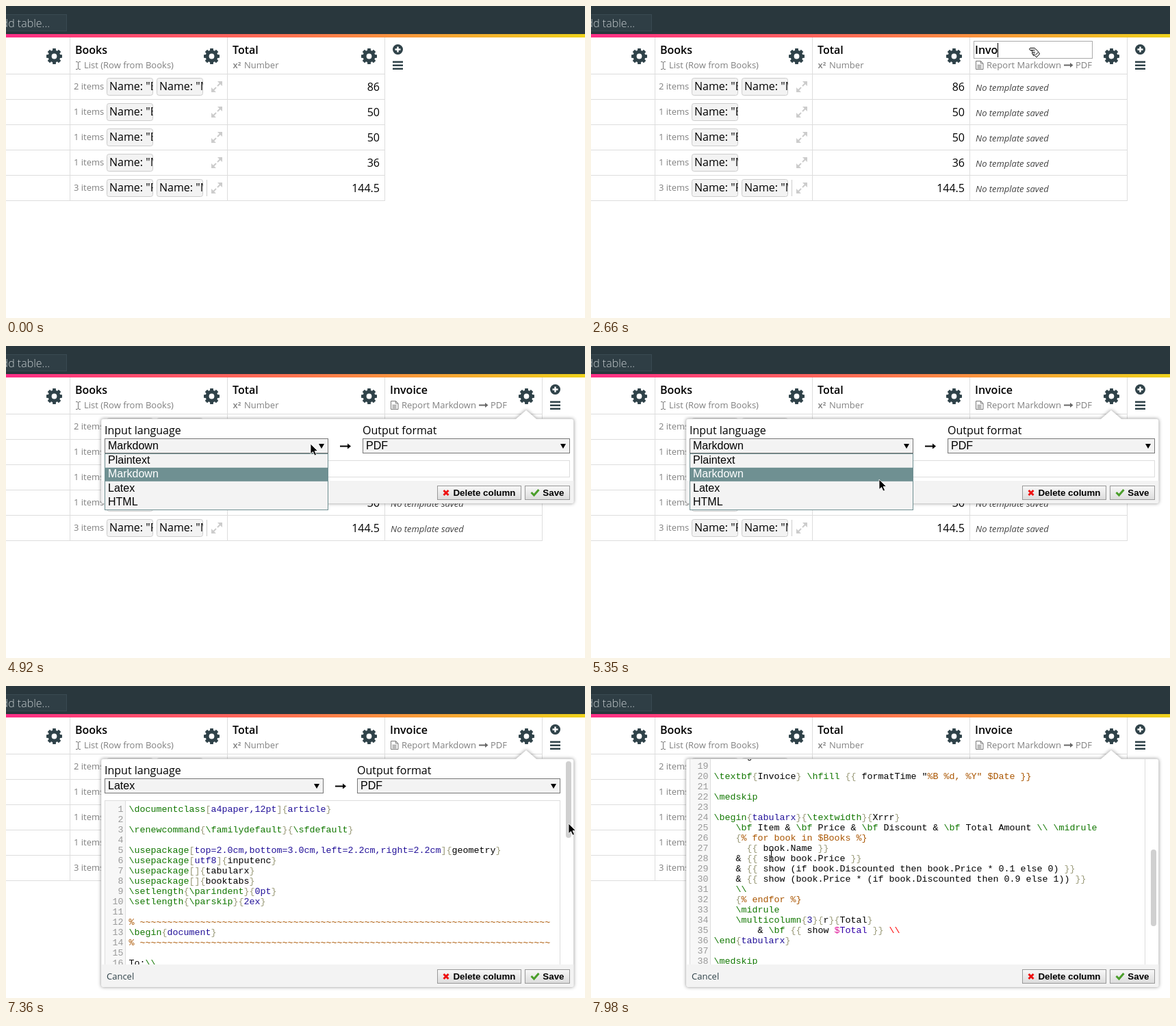
Recreate the animation shown at these times as an HTML page. Size 846 px wide and 456 px high, loop 8 s.

```html
<!DOCTYPE html>
<html lang="en">
<head>
<meta charset="utf-8">
<title>Report column</title>
<style>
html, body { margin: 0; width: 100%; height: 100%; overflow: hidden; background: #fff }
svg { display: block }
text { white-space: pre; font: 16px 'Open Sans', sans-serif }
.end { text-anchor: end }
.bold { font-weight: 600 }
.light { font-weight: 300; fill: #c3cacc }
.small { font-size: 13px; fill: #808080 }
.note { font-size: 13px; font-style: italic; fill: #444 }
.link { font-size: 13px; fill: #2f4249 }
.ui { font: 16px 'Liberation Sans', Arial, sans-serif }
.btn { font: bold 13.333px 'Liberation Sans', Arial, sans-serif }
.code { font: 13.333px 'Liberation Mono', monospace }
.num { fill: #999 }
.panel { filter: drop-shadow(0 0 2.5px rgba(0,0,0,.4)) }
</style>
</head>
<body>
<svg id="stage" width="846" height="456" viewBox="0 0 846 456"></svg>
<script>
const DARK = '#2f4249', PINK = '#ff1f87', LOOP = 8000, STEP = 10;
const $ = id => document.getElementById(id);
const range = n => [...Array(n).keys()];
const text = (x, y, s, cls = '', more = '') => `<text x="${x}" y="${y}" class="${cls}" ${more}>${s}</text>`;
const rect = (x, y, w, h, fill, more = '') => `<rect x="${x}" y="${y}" width="${w}" height="${h}" fill="${fill}" ${more}/>`;
const line = (d, color, w = 1) => `<path d="${d}" fill="none" stroke="${color}" stroke-width="${w}"/>`;
const shape = (d, fill, more = '') => `<path d="${d}" fill="${fill}" ${more}/>`;
const group = (id, body, more = '') => `<g id="${id}" ${more}>${body}</g>`;

// ---- table ----
const gearPath = 'M' + range(8).flatMap(i =>
  [[9, -.28], [11.7, -.2], [11.7, .2], [9, .28]].map(([r, da]) => {
    const a = i * Math.PI / 4 + da;
    return (r * Math.cos(a)).toFixed(2) + ' ' + (r * Math.sin(a)).toFixed(2);
  })).join('L') + 'Z';
const gear = (x, id = '') => `<g transform="translate(${x} 73.5)">` +
  shape(gearPath, DARK, id && `id="${id}"`) + '<circle r="3.9" fill="#fff"/></g>';

const chip = (x, y, letter) =>
  rect(x + .5, y + .5, 67, 25, '#f3f3f3', 'rx="3" stroke="#ccc"') +
  `<svg x="${x}" y="${y}" width="67.5" height="26">${text(4, 18, 'Name: "' + letter)}</svg>`;

const expand = y => shape(`M316 ${y + 10}v7l-7-7zM300 ${y + 26}v-7l7 7z`, '#ccc') +
  line(`M314 ${y + 12}l-5 5M302 ${y + 24}l5-5`, '#ccc', 2);

const rows = [[2, 'BM', 86], [1, 'B', 50], [1, 'B', 50], [1, 'M', 36], [3, 'PM', 144.5]];
const row = ([n, letters, total], i) => {
  const y = 100 + 37 * i;
  return text(99, y + 22, n + ' items', 'small') +
    [...letters].map((c, k) => chip(147 + 73 * k, y + 5, c)).join('') +
    (n > 2 ? line(`M293.5 ${y + 6}v24`, '#ccc') : '') +
    expand(y) + text(546, y + 24, total, 'end');
};
const grid = (x, w) => line(range(6).map(i => `M${x} ${99.5 + 37 * i}h${w}`).join('') +
  `M${x + w - .5} 46v239`, '#ddd');

const header = rect(0, 0, 846, 41, '#29373d') +
  rect(-5, 12.5, 93.5, 24, '#2f3e45', 'stroke="#394a52"') +
  text(64, 31, 'Add table...', 'light end') + rect(0, 41, 846, 5, 'url(#rainbow)');

const table = grid(0, 554) + line('M93.5 46v239M323.5 46v239', '#ddd') +
  gear(70.5) + gear(300.5) + gear(530.5) +
  text(101, 70, 'Books', 'bold') + text(114, 91, 'List (Row from Books)', 'small') +
  line('M102 81.5h2l1.5 1 1.5-1h2M105.5 82v10M102 92.5h2l1.5-1 1.5 1h2', '#777') +
  text(331, 70, 'Total', 'bold') + text(331.5, 91, 'x²', 'small bold') + text(348, 91, 'Number', 'small') +
  rows.map(row).join('');

const newColumn = grid(554, 230) + gear(760.5, 'gear') +
  rect(559.5, 51.5, 173, 25, '#fff', 'id="box" stroke="#aaa"') +
  text(561, 70, 'Name...', '', 'id="hint" fill="#999"') + text(561, 70, '', 'bold', 'id="title"') +
  rect(561, 54, 1, 21, '#000', 'id="caret"') +
  line('M562.5 80.5h7l3.5 3.5v8.5h-10.5zM569.5 80.5v3.5h3.5M564.5 86.5h6M564.5 88.5h6M564.5 90.5h6', '#777') +
  text(578, 91, 'Report Markdown', 'small') + text(708, 91, 'PDF', 'small') +
  line('M691 86.5h10', '#666', 2) + shape('M700 83l4.5 3.5-4.5 3.5z', '#666') +
  range(5).map(i => text(562, 124 + 37 * i, 'No template saved', 'note')).join('');

const adders = `<circle cx="572.5" cy="63.5" r="7.5" fill="${DARK}"/>` + line('M568.5 63.5h8M572.5 59.5v8', '#fff', 2.4) +
  shape('M565 80.5h15v2.5h-15zM565 85.5h15v2.5h-15zM565 90.5h15v2.5h-15z', DARK, 'id="menu"');

// ---- template editor ----
const source = String.raw`\documentclass[a4paper,12pt]{article}

\renewcommand{\familydefault}{\sfdefault}

\usepackage[top=2.0cm,bottom=3.0cm,left=2.2cm,right=2.2cm]{geometry}
\usepackage[utf8]{inputenc}
\usepackage[]{tabularx}
\usepackage[]{booktabs}
\setlength{\parindent}{0pt}
\setlength{\parskip}{2ex}

%~
\begin{document}
%~

To:\\
Tilman Voske\\
Hamburg

\textbf{Invoice} \hfill {{ formatTime "%B %d, %Y" $Date }}

\medskip

\begin{tabularx}{\textwidth}{Xrrr}
    \bf Item & \bf Price & \bf Discount & \bf Total Amount \\ \midrule
    {% for book in $Books %}
      {{ book.Name }}
    & {{ show book.Price }}
    & {{ show (if book.Discounted then book.Price * 0.1 else 0) }}
    & {{ show (book.Price * (if book.Discounted then 0.9 else 1)) }}
    \\
    {% endfor %}
    \midrule
    \multicolumn{3}{r}{Total}
        & \bf {{ show $Total }} \\
\end{tabularx}

\medskip`.replaceAll('%~', '% ' + '~'.repeat(75)).split('\n');

const tokens = [
  ['#a50', '%.*'],
  ['#f00', String.raw`(?<=\}\} )\\\\`],
  ['#170', String.raw`\\[a-z]+|\\\\`],
  ['#219', String.raw`(?<=\[)[^\]]+|(?<=pt\]\{|begin\{|end\{)\w+|(?<=\{)\d\w*`],
  ['#997', String.raw`[{}\[\]]`],
  ['#e0189a', String.raw`\$`],
  ['#30a', String.raw`(?<=\$)Total`],
];
const syntax = new RegExp(tokens.map(([, re]) => `(${re})`).join('|'), 'g');
const paint = s => s.replace(syntax, (m, ...found) =>
  `<tspan fill="${tokens[found.findIndex((g, i) => i < tokens.length && g !== undefined)][0]}">${m}</tspan>`);
const codeLine = (s, i) => text(171.5, 184 + 15 * i, i + 1, 'code num end') +
  text(179.5, 184 + 15 * i, paint(s.replaceAll('&', '&amp;')), 'code');

const select = (x, right, label, id) =>
  rect(x + .5, 135.5, right - x, 21, '#f3f3f3', 'stroke="#777"') +
  text(x + 5, 151, label, 'ui', id && `id="${id}"`) +
  shape(`M${right - 13} 143h8l-4 7z`, '#000');

const button = (x, y, w, label, icon, color) =>
  rect(x + .5, y + .5, w, 20, 'url(#button)', 'stroke="#999"') +
  line(icon, color, 3) + text(x + w - 7.5, y + 15, label, 'btn end');

const form = (lines, lang, id, leftEnd, out, right, height) =>
  text(144, 129, 'Input language') + select(144, leftEnd, lang, id) +
  line(`M${leftEnd + 18} 146.5h12`, '#000', 2) + shape(`M${leftEnd + 29} 142.5l5 4-5 4z`, '#000') +
  text(out, 129, 'Output format') + select(out, right, 'PDF') +
  rect(144.5, 167.5, right - 144, height, '#fff', 'stroke="#ddd"') +
  rect(145, 168, 29, height - 1, '#f7f7f7') + line(`M174.5 168v${height - 1}`, '#ddd') +
  lines.map(codeLine).join('');

const popup = (id, height, content) => {
  const foot = 107 + height, y = foot + 7;
  return group(id,
    shape(`M142 106.5H745L760 93.5L775 106.5H826.5a3 3 0 0 1 3 3V${foot + 30}a3 3 0 0 1-3 3H142a3 3 0 0 1-3-3V109.5a3 3 0 0 1 3-3z`, '#fff', 'class="panel" stroke="#ccc" stroke-width=".5"') +
    `<svg y="107" width="846" height="${height}" viewBox="0 107 846 ${height}">${content}</svg>` +
    shape(`M139.5 ${foot}h690v30a3 3 0 0 1-3 3h-684a3 3 0 0 1-3-3z`, '#f3f3f3') +
    text(147, foot + 22, 'Cancel', 'link') +
    button(630, y, 122, 'Delete column', `M639.5 ${y + 7}l7 7m0-7l-7 7`, '#e11') +
    button(758, y, 65, 'Save', `M767.5 ${y + 10}l4 4 7-8`, '#4a9e2a'));
};

const options = ['Plaintext', 'Markdown', 'Latex', 'HTML'];
const optionY = i => 157.5 + 20.3 * i;
const list = rect(144.5, 157.5, 326, 82, '#f3f3f3', 'stroke="#6f9092"') +
  rect(145, 178, 325, 20, '#6f9092', 'id="mark"') +
  options.map((s, i) => text(149, optionY(i) + 14.5, s, 'ui', `id="option${i}"`)).join('');

// ---- pointers, drawn with the hot spot at 0,0 ----
const outline = 'stroke="#000" stroke-linejoin="round"';
const pointers = {
  arrow: shape('M0 0V14.5L3.5 11.5L6 17L8.5 16L6 10.5H10.5Z', '#000', 'stroke="#fff" stroke-width=".8"'),
  hand: shape('M1.5 .5H8L12.5 4.5L15.5 9L11 14L8.5 11.5H6.5L5.5 9.5L4.5 8L5 6.5L4 5L5 3.5H1.5Q-.5 2 1.5 .5Z', '#fff', outline) +
    line('M5 3.5H8.5M5 6.5H9M5.5 9.2H9M9.5 10.5l3.5-3.5', '#000'),
  beam: line('M-2.5 -8.5h2l1 1 1-1h2M.5 -8v15M-2.5 7.5h2l1-1 1 1h2', '#000'),
};

$('stage').innerHTML = `<defs>
  <linearGradient id="rainbow"><stop stop-color="#ff2d87"/><stop offset=".5" stop-color="#ff7450"/><stop offset="1" stop-color="#efd21b"/></linearGradient>
  <linearGradient id="button" x2="0" y2="1"><stop stop-color="#f8f8f8"/><stop offset="1" stop-color="#dcdcdc"/></linearGradient></defs>` +
  header + table + group('column', newColumn) + group('adders', adders) +
  popup('small', 90, form([''], '', 'lang', 470, 521, 823, 24) + rect(179, 172, 1, 15, '#000', 'id="codeCaret"')) +
  popup('large', 300, group('scroll', form(source, 'Latex', '', 463, 513, 809, 800)) +
    rect(818, 110, 8, 112, '#d0d0d0', 'rx="4" id="thumb"')) +
  group('list', list) +
  group('pointer', Object.entries(pointers).map(([id, body]) => group(id, body)).join(''));

// ---- motion ----
const smooth = a => a * a * (3 - 2 * a);
const easeOut = a => 1 - (1 - a) ** 2;
const progress = (t, from, to) => Math.min(1, Math.max(0, (t - from) / (to - from)));

const path = [ // from, to, x, y, easing
  [640, 700, 573, 87], [1090, 1440, 640, 61], [3550, 3890, 763, 73], [4100, 4590, 445, 143],
  [4920, 5440, 419, 200], [5700, 6010, 300, 178], [6540, 7010, 834, 188], [7010, 7170, 822, 201],
  [7360, 7540, 810, 326, easeOut], [7680, 7980, 263, 249],
];
const pointerAt = t => path.reduce(([x, y], [from, to, nx, ny, ease = smooth]) => {
  const p = ease(progress(t, from, to));
  return [x + (nx - x) * p, y + (ny - y) * p];
}, [573, 91]);

const keyTimes = [2010, 2180, 2470, 2660, 2750, 2840, 2940];
const show = (id, on) => $(id).style.display = on ? '' : 'none';
const set = (id, name, value) => $(id).setAttribute(name, value);
const within = (t, a, b) => t >= a && t < b;

function draw(t) {
  const [x, y] = pointerAt(t);
  const added = t >= 1090, pasted = t >= 6540;

  show('column', added);
  set('adders', 'transform', `translate(${added ? 230 : 0})`);
  set('menu', 'fill', within(t, 655, 1090) ? PINK : DARK);

  const typed = 'Invoice'.slice(0, keyTimes.filter(k => t >= k).length);
  $('title').textContent = typed;
  show('hint', !typed);
  show('box', within(t, 1350, 3550));
  show('caret', within(t, 1350, 1850) || within(t, 2010, 3330));
  set('caret', 'x', Math.floor(561 + (typed && added ? $('title').getComputedTextLength() : 0)));

  const onGear = added && Math.hypot(x - 760, y - 73.5) < 12;
  set('gear', 'fill', onGear ? PINK : DARK);

  show('small', t >= 4100 && !pasted);
  $('lang').textContent = t < 5700 ? 'Markdown' : 'Latex';
  show('codeCaret', within(t, 5850, 6360));

  show('list', within(t, 4590, 5700));
  const hot = y < 157 ? 1 : y < 177 ? 0 : y < 198 ? 1 : 2;
  set('mark', 'y', optionY(hot));
  options.forEach((_, i) => set('option' + i, 'fill', i === hot ? '#fff' : '#000'));

  show('large', pasted);
  const scroll = Math.round(333 * smooth(progress(t, 7358, 7540)));
  set('scroll', 'transform', `translate(0 ${-scroll})`);
  set('thumb', 'y', 110 + scroll * .3875);

  const kind = t < 655 ? 'arrow' : t < 4100 || onGear ? 'hand' :
    t > 5850 && x < 810 && y > 168 ? 'beam' : 'arrow';
  show('pointer', t >= 640);
  Object.keys(pointers).forEach(id => show(id, id === kind));
  set('pointer', 'transform', `translate(${Math.round(x)} ${Math.round(y)})`);
}

// The recording advances in steps of 10 ms.
const start = performance.now();
function tick() {
  const t = (performance.now() - start) % LOOP;
  draw(Math.floor(t / STEP) * STEP);
  requestAnimationFrame(tick);
}
tick();
</script>
</body>
</html>
```
